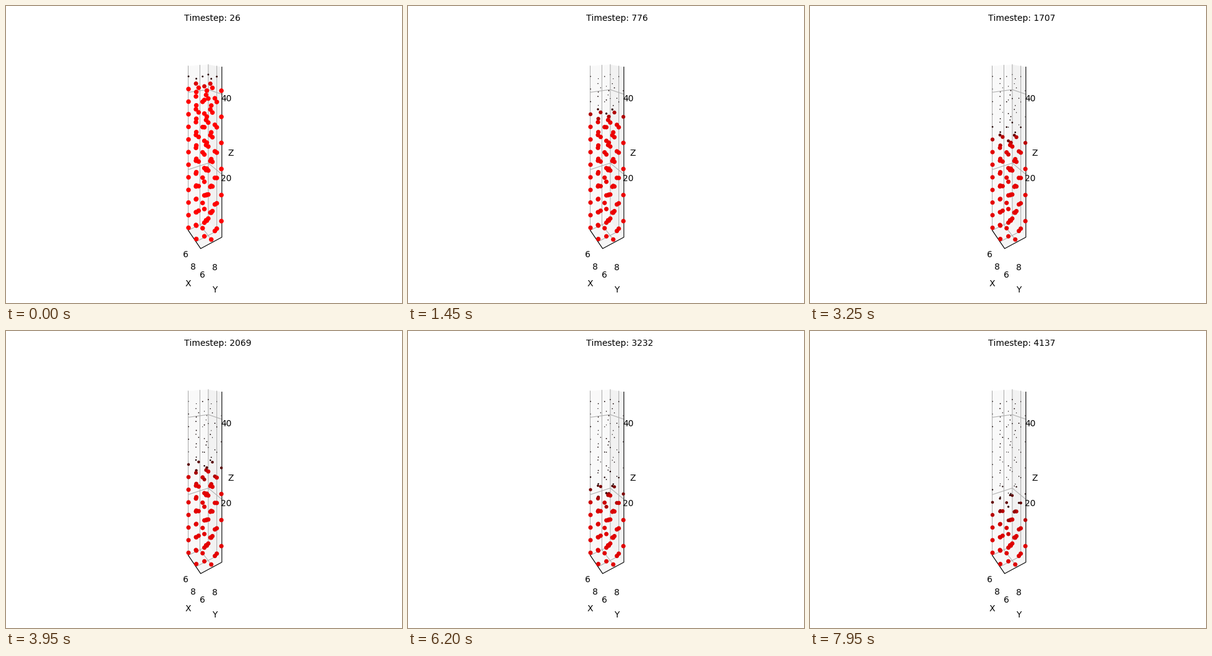
Recreate the animation shown at these times as a matplotlib script. Size 640 by 480 pixels, loop 8000 ms.

```python
import numpy as np
import matplotlib.pyplot as plt
from matplotlib.animation import FuncAnimation

plt.rcParams["text.kerning_factor"] = 6
plt.rcParams["font.family"] = "DejaVu Sans"

W, H, DPI = 640, 480, 100
FRAMES, INTERVAL = 160, 50
STEP = 25.8575                  # simulation steps per frame
HORIZON, EYE_Z, CELL = 52, 54, 6.53
BOTTOM, TOP = 4.3, 46.8         # z range of the box
A, B = 2.03, 3.1                # floor size in lattice rows and columns
LAYERS = 25
GRID = "#b0b0b0"


def project(a, b, z):
    """Pixel position of lattice row a, column b and height z."""
    scale = 1000 / (25.79 - 0.63 * a - 0.687 * b)
    x = 320 + scale * (0.178 - 0.396 * a + 0.163 * b)
    return x, HORIZON + scale * (EYE_Z - z) / CELL


def build_atoms():
    atoms = []

    def column(a, b, first, step):
        for n in range(first, LAYERS, step):
            atoms.append((*project(a, b, 5 + n * CELL / 4), n))

    for odd in (0, 1):
        shift = 0.65 * odd
        for row in range(2 - odd):
            for b in range(odd, 4):
                column(row + shift, b, odd + 2 * ((row + b + odd) % 2), 4)
        for b in (odd, odd + 2):
            column(2 - odd + shift, b, odd, 2)
    return np.array(sorted(atoms, key=lambda p: p[1])).T


fig = plt.figure(figsize=(W / DPI, H / DPI), dpi=DPI, facecolor="white")
ax = fig.add_axes([0, 0, 1, 1])
ax.set(xlim=(0, W), ylim=(H, 0))
ax.axis("off")


def pane(color, *corners):
    ax.fill(*zip(*(project(*c) for c in corners)), color=color, lw=0, zorder=1)


def line(color, *points):
    ax.plot(*zip(*(project(*p) for p in points)), color=color, lw=0.8, zorder=2)


def label(x, y, s):
    ax.text(x, y, s, fontsize=10, ha="center", va="baseline", zorder=4)


# Back walls and floor
pane("#f9f9f9", (A, 0, TOP), (0, 0, TOP), (0, 0, BOTTOM), (A, 0, BOTTOM))
pane("#f2f2f2", (0, 0, TOP), (0, B, TOP), (0, B, BOTTOM), (0, 0, BOTTOM))
pane("#f6f6f6", (A, 0, BOTTOM), (0, 0, BOTTOM), (0, B, BOTTOM), (A, B, BOTTOM))

for b in (0, 2):
    line(GRID, (A, b, BOTTOM), (0, b, BOTTOM), (0, b, TOP))
for a in (0.87, A):
    line(GRID, (a, B, BOTTOM), (a, 0, BOTTOM), (a, 0, TOP))
for z in (20, 40):
    line(GRID, (A, 0, z), (0, 0, z), (0, B, z))
line("black", (A, 0, BOTTOM), (A, B, BOTTOM), (0, B, BOTTOM), (0, B, TOP))

for i, tick in enumerate("68"):
    label(290.5 + 12 * i, 406 + 20 * i, tick)
    label(317.5 + 20 * i, 439 - 12 * i, tick)
label(356.5, 154, "40")
label(355.5, 283, "20")
label(294.5, 453, "X")
label(337, 463, "Y")
label(363, 242, "Z")

xs, ys, layer = build_atoms()
title = ax.text(288, 24, "", fontsize=10, va="baseline")
dots = ax.scatter(xs, ys + 0.5, s=20, c="red", linewidths=0, zorder=3)


def occupancy(i):
    """Share of each site still filled; the front sinks and blurs with time."""
    r = np.sqrt(STEP * (i + 1))
    front = 24.45 - 0.18 * r - 0.00125 * r * r
    spread = 0.28 + 0.0002 * r * r
    bulk = 0.855 + 0.165 * np.exp(-r / 30)
    filled = bulk / (1 + np.exp((layer - front) / spread))
    residue = np.random.default_rng(i).uniform(0.025, 0.06, len(layer))
    return np.clip(filled, residue, 1)


def update(i):
    c = occupancy(i)
    dots.set_sizes((7.5 * 72 / DPI) ** 2 * c)
    dots.set_facecolors(np.column_stack([c, 0 * c, 0 * c, np.ones_like(c)]))
    title.set_text(f"Timestep: {round(STEP * (i + 1))}")
    return dots, title


anim = FuncAnimation(fig, update, frames=FRAMES, interval=INTERVAL,
                     repeat=True, repeat_delay=0)
plt.show()
```
